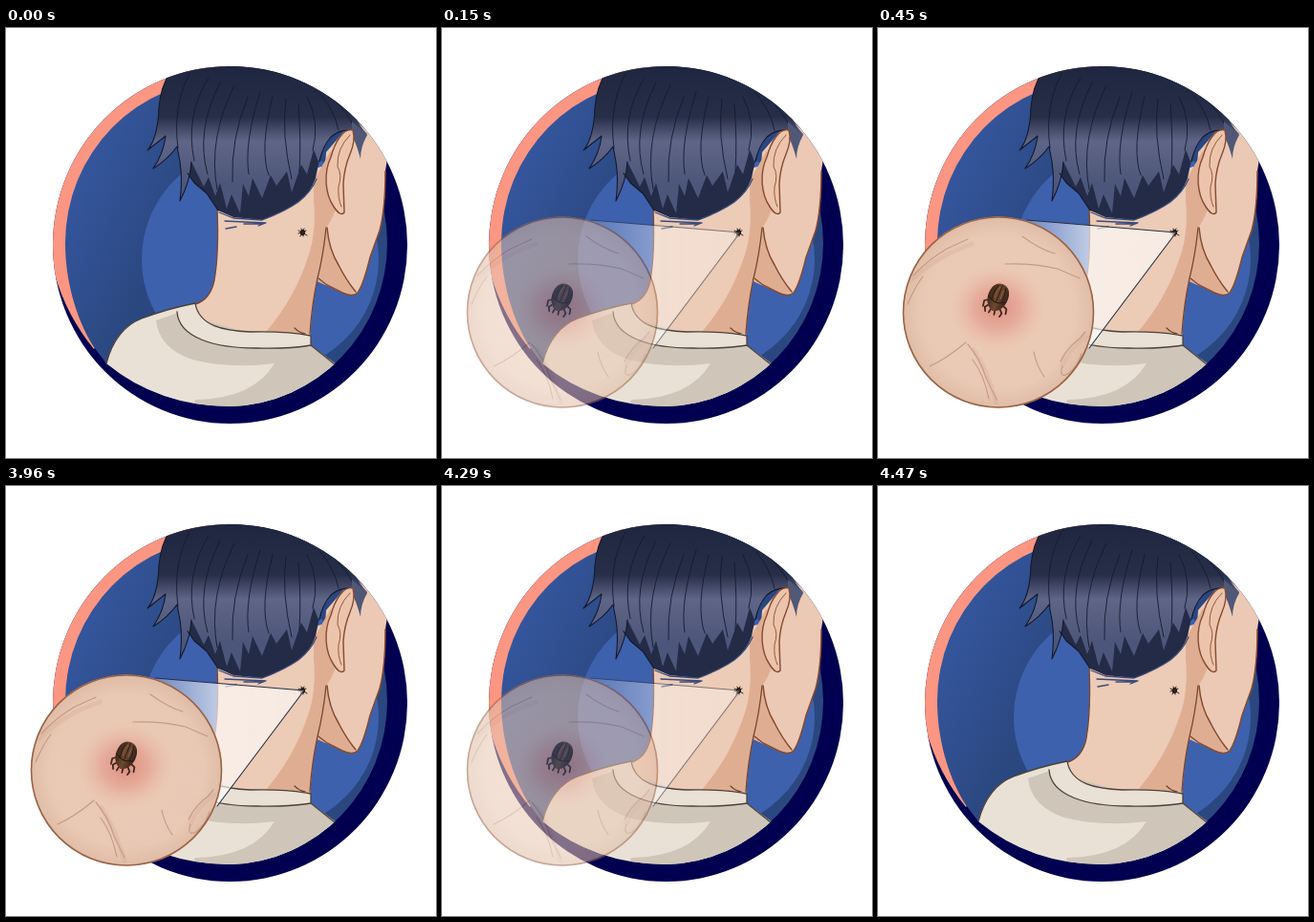
An HTML page for the animation above (4500 ms loop, 450x450 px).

```html
<!DOCTYPE html>
<html lang="en">
<head>
<meta charset="utf-8">
<title>Tick bite on the neck</title>
<style>
  html, body { margin: 0; width: 100%; height: 100%; overflow: hidden; background: #fff; }
  svg { display: block; width: 100vw; height: 100vh; }
  .line { fill: none; stroke-linecap: round; stroke-linejoin: round; }
</style>
</head>
<body>
<svg viewBox="0 0 450 450">
  <defs>
    <path id="disc" d="M230.5 54A168.5 171 0 0 0 62 225C62 262 72 302 92 334L105 351Q160 396 235 396A168.5 171 0 0 0 399 225 168.5 171 0 0 0 230.5 54Z"/>
    <clipPath id="outer"><ellipse cx="234.5" cy="227" rx="185.5" ry="187"/></clipPath>
    <clipPath id="inner"><use href="#disc"/></clipPath>
    <clipPath id="lensClip"><circle cx="126" cy="297.5" r="100"/></clipPath>
    <linearGradient id="backdrop" gradientUnits="userSpaceOnUse" x1="65" y1="190" x2="165" y2="240">
      <stop offset="0" stop-color="#34559b"/><stop offset="1" stop-color="#2b477f"/>
    </linearGradient>
    <linearGradient id="hair" gradientUnits="userSpaceOnUse" x1="250" y1="40" x2="250" y2="200">
      <stop offset="0" stop-color="#1f2740"/><stop offset=".33" stop-color="#272e48"/>
      <stop offset=".49" stop-color="#5f6586"/><stop offset=".78" stop-color="#4c567a"/>
    </linearGradient>
    <linearGradient id="beam" gradientUnits="userSpaceOnUse" x1="156" y1="0" x2="312" y2="0">
      <stop offset="0" stop-color="#fff" stop-opacity=".25"/><stop offset=".4" stop-color="#fff" stop-opacity=".66"/>
      <stop offset="1" stop-color="#fff" stop-opacity=".6"/>
    </linearGradient>
    <radialGradient id="skin">
      <stop offset="0" stop-color="#edcab5"/><stop offset=".8" stop-color="#e9c9b5"/><stop offset="1" stop-color="#e0bca6"/>
    </radialGradient>
    <radialGradient id="rash">
      <stop offset="0" stop-color="#d97b6e" stop-opacity=".75"/><stop offset=".5" stop-color="#e18f82" stop-opacity=".5"/>
      <stop offset="1" stop-color="#e9b3a2" stop-opacity="0"/>
    </radialGradient>
    <linearGradient id="shell">
      <stop offset="0" stop-color="#38241a"/><stop offset=".5" stop-color="#70492f"/><stop offset="1" stop-color="#33221a"/>
    </linearGradient>
  </defs>

  <!-- Badge -->
  <g clip-path="url(#outer)">
    <path fill="#010050" d="M0 0H450V450H0Z"/>
    <path fill="#fb9682" d="M235 30H40V225L51 258Q64 302 92 336L150 250Z"/>
    <use href="#disc" fill="url(#backdrop)"/>
    <ellipse cx="266" cy="242" rx="124" ry="120" fill="#3e61ae" clip-path="url(#inner)"/>
  </g>

  <!-- Face and neck -->
  <g clip-path="url(#outer)">
    <path fill="#ecc9b4" d="M335 130L365 95 400 130 397 150Q397 190 391 212L381 240Q374 269 368 277 362 282 352 277L326 265 330 205Z"/>
    <path fill="#dfae92" d="M335 207Q338 232 348 248 356 264 366 276 360 281 352 277L326 265Z"/>
    <path class="line" stroke="#854a30" stroke-width="1.5" d="M397 150Q397 190 391 212L381 240Q374 269 368 277 362 282 352 277L336 269 327 262M336 209Q338 232 348 248 356 264 366 276"/>
    <path fill="#eccbb7" d="M220 180L330 145 335 209Q332 238 326 262 320 290 318 326L260 332 195 300 198 290Q214 284 218 264 223 235 221 188Z"/>
    <path fill="#dfae92" d="M322 160L340 128 345 190Q340 203 335 209 332 238 326 262 320 290 318 320L272 318Q302 283 316 240 325 215 322 180Z"/>
    <path class="line" stroke="#754631" stroke-width="1.3" d="M221 190Q223 235 218 264 214 284 198 289M335 209Q332 238 326 262 320 290 318 320M302 314Q307 319 313 320"/>
  </g>

  <!-- Shirt -->
  <g clip-path="url(#inner)">
    <path id="shirt" fill="#e9e1d5" d="M198 288Q168 294 142 304C124 311 112 325 105 351L130 420H330L345 352 319 332 319 322Q293 317 256 318C228 317 202 312 198 288Z"/>
    <path fill="#cfc6b9" d="M157 306Q160 335 195 347 235 357 281 351 259 388 198 389L190 410H330L346 352 319 332 250 318 180 298Z"/>
    <path fill="#e9e1d5" d="M198 288L179 297C181 325 220 335 262 335Q295 336 319 332L319 322Q293 317 256 318C228 317 202 312 198 288Z"/>
  </g>
  <path class="line" stroke="#4b4037" stroke-width="1.3" d="M105 351C112 325 124 311 142 304Q168 294 198 288C202 312 228 317 256 318Q293 317 319 322L319 332 344 352M179 297C181 325 220 335 262 335Q295 336 319 332"/>

  <!-- Hair -->
  <g clip-path="url(#outer)">
    <path fill="#232b47" d="M189 130L190 152 197 162 210 173 222 191 238 198 268 201Q292 192 306 182 319 172 324 157L329 133 300 110Z"/>
    <path fill="url(#hair)" d="M172 46Q190 30 235 32 310 30 351 76L365 91Q370 103 378 111L373 120 363 107Q349 106 340 114 331 124 327 140L322 127 315 153 309 143 299 172 294 150 283 165 277 154 268 178 258 157 254 176 248 163 245 194 236 174 231 189 224 162 219 176 212 156 207 166 194 140Q193 160 182 181 185 159 182 140L179 124Q169 138 154 147 165 131 167 113L148 128Q159 115 160 83 162 61 172 46Z"/>
    <path class="line" stroke="#11182c" stroke-width="1.1" d="M172 46Q162 61 160 83 159 115 148 128L167 113Q165 131 154 147 169 138 179 124L182 140Q185 159 182 181 193 160 194 140M190 152L197 162 210 173 222 191M363 107Q349 106 340 114 331 124 328 140"/>
    <path class="line" stroke="#151b30" stroke-width=".9" d="M192 48Q174 82 180 126M212 52Q187 92 197 139M224 57Q198 108 211 153M239 60Q211 116 221 169M253 72Q235 116 237 161M266 67Q249 120 254 153M279 72Q265 128 275 154M293 74Q288 112 299 158M306 80Q309 120 307 150M315 72Q329 98 321 128M329 69Q344 87 348 107M341 73Q355 86 363 101"/>
    <path class="line" stroke="#3b4a78" stroke-width="1.3" d="M223 193L238 199 268 201Q292 192 306 182 319 172 325 158M229 202L272 204 264 207M230 210L241 208M249 205H267"/>
    <path fill="#4f5877" d="M362 98L378 112Q371 124 371 137 367 122 362 112Z"/>
  </g>

  <!-- Ear -->
  <path fill="#ecc4ab" stroke="#854a30" stroke-width="1.4" d="M363 107C353 104 344 120 340 135 332 152 334 174 343 187Q350 198 354 193L353 163Q354 146 360 132 366 118 363 107Z"/>
  <path class="line" stroke="#945a3d" stroke-width="1" d="M360 112Q346 126 347 145 352 154 348 166 347 178 351 187"/>

  <!-- Tick on the neck -->
  <g stroke="#17120f" stroke-width=".9">
    <path class="line" d="M306 212L315 217M306 215L314 212M308 218L312 210M309 210L311 218"/>
    <ellipse cx="310.5" cy="214" rx="2.2" ry="2.7" fill="#30221a"/>
  </g>

  <!-- Magnified view -->
  <g id="zoom" opacity="0">
    <path fill="url(#beam)" d="M156 201L312 214 221 335 170 300Z"/>
    <path class="line" stroke="#2b2d3c" stroke-width="1.1" d="M156 201L312 214 221 335"/>
    <circle cx="126" cy="297.5" r="100" fill="url(#skin)"/>
    <g clip-path="url(#lensClip)">
      <ellipse cx="125" cy="293" rx="50" ry="45" fill="url(#rash)"/>
      <g class="line" stroke="#b88d79" stroke-width="1.2" opacity=".75">
        <path d="M37 259Q53 242 72 231L94 221M31 289Q39 270 47 260M133 247Q164 246 188 252L211 262M151 218Q170 232 185 236M94 331Q107 346 113 366L124 389M99 347Q111 363 116 388M54 354Q72 346 92 329M163 339Q166 354 174 365M191 349Q198 334 211 325L217 318M193 354Q189 367 199 362 209 354 213 341"/>
      </g>
      <path class="line" stroke="#cfa08c" stroke-width="5" opacity=".25" d="M35 264Q61 239 98 226M100 337Q113 356 124 392M193 353Q199 337 218 323"/>
    </g>
    <circle cx="126" cy="297.5" r="99.5" fill="none" stroke="#9a6347" stroke-width="1.6"/>
    <g transform="translate(125 283) rotate(22)">
      <path class="line" stroke="#37241a" stroke-width="1.7" d="M-6 3L-12 7-11 13M-5 8L-9 13-7 17M6 4L13 7 14 12M5 8L10 13 9 17M-2 11L-3 17M2 11L3 17"/>
      <path fill="url(#shell)" d="M0-16C9-16 12-6 10 3Q8 12 0 14-8 12-10 3C-12-6-9-16 0-16Z"/>
      <path class="line" stroke="#271a14" stroke-width=".9" d="M-9 1Q0 8 9 1M-4-13Q-7-4-5 3M0-15V4M4-13Q7-4 5 3"/>
      <path class="line" stroke="#9c704d" stroke-width="1.1" opacity=".7" d="M-2-12Q-4-7-3 0M3-10L3-1"/>
    </g>
  </g>
</svg>
<script>
  const LOOP = 4500, STEP = 30;
  const zoom = document.getElementById("zoom");

  // Quadratic fade: decelerating in, accelerating out.
  function opacityAt(ms) {
    if (ms < 450) return 1 - (1 - ms / 450) ** 2;
    return Math.max(0, 1 - (Math.max(0, ms - 3930) / 540) ** 2);
  }

  const start = performance.now();
  function draw() {
    const ms = (performance.now() - start) % LOOP;
    zoom.setAttribute("opacity", opacityAt(Math.floor(ms / STEP) * STEP));
    requestAnimationFrame(draw);
  }
  draw();
</script>
</body>
</html>
```
